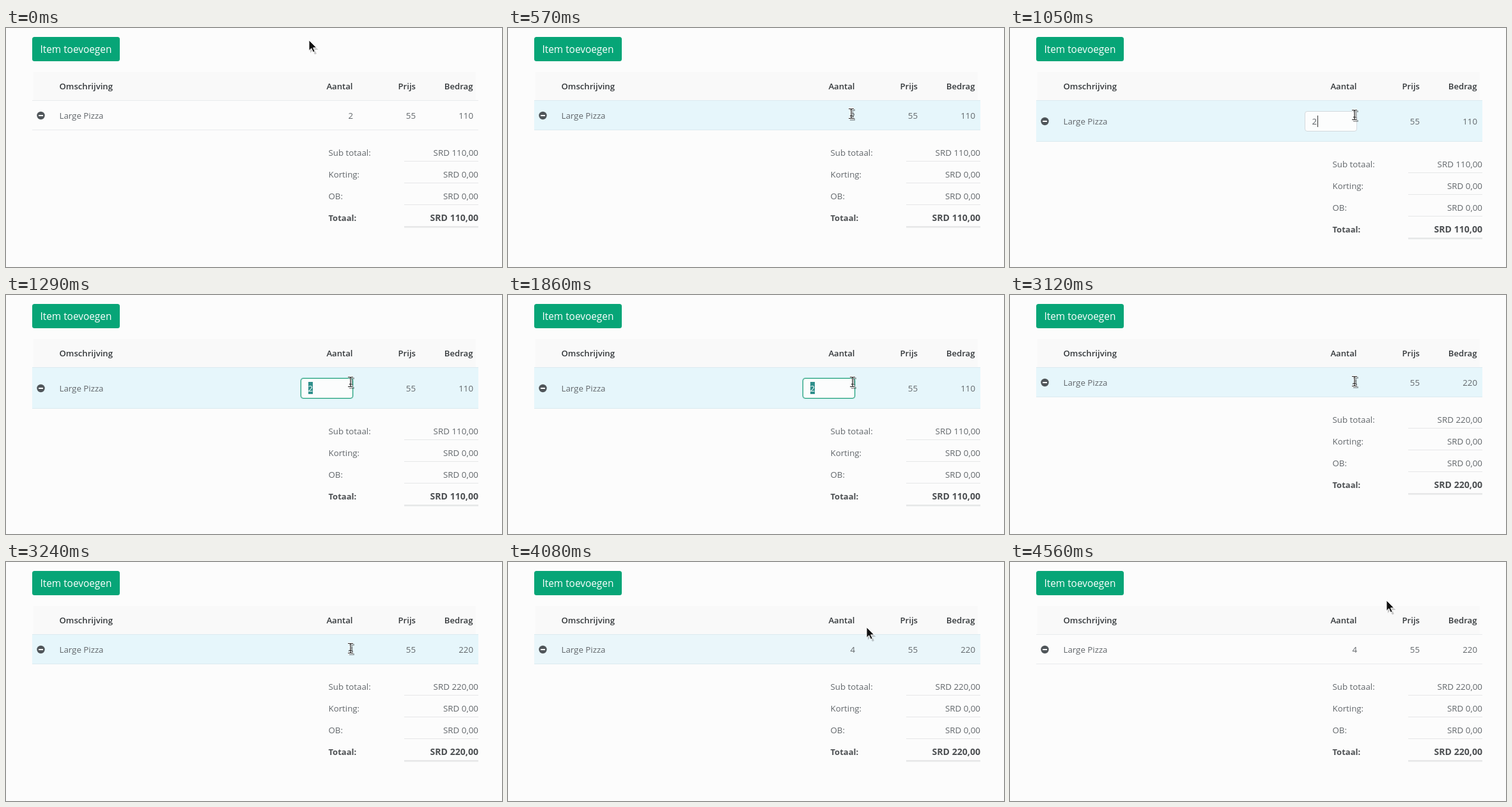
Animation of 776 by 374 pixels, one loop 5310 ms. Source, as an HTML page:

```html
<!DOCTYPE html>
<html lang="nl">
<head>
<meta charset="utf-8">
<style>
html, body { margin: 0; width: 100%; height: 100%; overflow: hidden; background: #fcfcfc; }
svg { display: block; }
text { font: 13.3px "Open Sans", "Noto Sans", sans-serif; fill: #62676b; }
.head text { font-weight: 600; font-size: 13.15px; fill: #34383b; }
.right { text-anchor: end; }
.sum .right text { font-size: 13.4px; }
.sum line { stroke: #e6e7e8; }
.sum .bold { font-weight: 700; fill: #4c4f52; }
.sum .right .bold { font-size: 14.1px; }
</style>
</head>
<body>
<svg width="776" height="374" viewBox="0 0 776 374">
  <rect x="41" y="14" width="137" height="38" rx="3.5" fill="#07a577"/>
  <text x="53.5" y="39" style="font-size:15.4px;fill:#fff">Item toevoegen</text>

  <rect x="43" y="69" width="692" height="44" fill="#f9f9f9"/>
  <g class="head">
    <text x="83.5" y="96">Omschrijving</text>
    <g class="right">
      <text x="542.5" y="96">Aantal</text>
      <text x="641" y="96">Prijs</text>
      <text x="730.5" y="96">Bedrag</text>
    </g>
  </g>

  <rect id="hover" x="41" y="114" width="698" fill="#e6f6fb"/>
  <path id="rules"/>
  <g id="row">
    <circle cx="54.5" cy="137" r="6.2" fill="#50565a"/>
    <rect x="51" y="136" width="7" height="2" rx=".5" fill="#fff"/>
    <text x="83.5" y="142">Large Pizza</text>
    <g class="right">
      <text id="count" x="543" y="142"></text>
      <text x="641" y="142">55</text>
      <text id="amount" x="731" y="142"></text>
    </g>
  </g>

  <g id="sums" class="sum">
    <text x="504.5" y="200">Sub totaal:</text>
    <text x="504.5" y="234">Korting:</text>
    <text x="504.5" y="268">OB:</text>
    <text x="504.5" y="302" class="bold" style="font-size:13px">Totaal:</text>
    <g class="right">
      <text id="sub" x="739" y="200"></text>
      <text x="739" y="234">SRD 0,00</text>
      <text x="739" y="268">SRD 0,00</text>
      <text id="total" x="739" y="302" class="bold"></text>
    </g>
    <line x1="623" x2="739" y1="208.5" y2="208.5"/>
    <line x1="623" x2="739" y1="242.5" y2="242.5"/>
    <line x1="623" x2="739" y1="276.5" y2="276.5"/>
    <line x1="623" x2="739" y1="311.3" y2="311.3" stroke-width="2.6"/>
  </g>

  <g id="input">
    <rect x="461.5" y="130.5" width="81" height="31" rx="3.5" fill="#fcfdfd" stroke="#d3d9dd"/>
    <g id="focus" fill="none">
      <rect x="460.5" y="129.5" width="83" height="33" rx="4.5" stroke="#09a577" stroke-opacity=".25"/>
      <rect x="461.5" y="130.5" width="81" height="31" rx="3.5" stroke="#1d9d79"/>
    </g>
    <rect id="select" x="473" y="136" width="7" height="19" fill="#308f8b"/>
    <text id="value" x="472.5" y="151"></text>
    <path id="caret" d="M481.5 137v18" stroke="#333"/>
  </g>

  <g id="arrow">
    <path d="M2 3v17l4-4 3 6.5 3-1.3-3-6.2h5.5z" fill="#000" opacity=".2"/>
    <path d="M0 0v16.5l3.8-3.6 2.7 6 2.8-1.2-2.7-5.8h5.2z" fill="#111" stroke="#fff"/>
  </g>
  <g id="beam" fill="none">
    <path id="shade" transform="translate(2 2)" stroke="#000" stroke-opacity=".35" stroke-width="2.5"/>
    <path id="halo" stroke="#fff" stroke-width="3"/>
    <path id="stem" stroke="#222" stroke-width="1.2"/>
  </g>
</svg>
<script>
const LOOP = 5310, STEP = 30, OPEN = 1050, TYPED = 2310, CLOSE = 2820;
const $ = id => document.getElementById(id);
const set = (id, attrs) => { for (const k in attrs) $(id).setAttribute(k, attrs[k]); };
const show = (id, on) => set(id, { opacity: +on });
const move = (id, x, y) => set(id, { transform: `translate(${x} ${y})` });
const clamp = v => Math.max(0, Math.min(1, v));
const ease = v => v * v * (3 - 2 * v);

// time, x, y
const path = [
  [0, 474, 19], [180, 474, 19], [570, 537, 134], [720, 538, 135],
  [870, 539, 136], [1830, 539, 136], [1920, 539, 135],
  [3900, 539, 135], [4290, 589, 60], [LOOP, 589, 60]
];

function pointer(t) {
  const i = path.findIndex(p => p[0] > t);
  const [t0, x0, y0] = path[i - 1], [t1, x1, y1] = path[i];
  const k = ease((t - t0) / (t1 - t0));
  return [Math.round(x0 + (x1 - x0) * k), Math.round(y0 + (y1 - y0) * k)];
}

const ibeam = "M-4-7.5h3l1 1 1-1h3M0-6.5v13M-4 7.500h3l1-1 1 1h3M-2 3.500h4";
for (const id of ["shade", "halo", "stem"]) set(id, { d: ibeam });

function draw(t) {
  const [x, y] = pointer(t);
  const inRow = y > 113;
  const editing = t >= OPEN && t < CLOSE;
  const done = t >= CLOSE;
  const selected = t >= OPEN + STEP && t < TYPED;
  const grow = editing ? 18 : 0;
  const bottom = 159.5 + grow;

  show("arrow", !inRow);
  show("beam", inRow);
  move("arrow", x, y);
  move("beam", x, y);

  const hover = clamp((t - 420) / 150) * (1 - clamp((t - 4050) / 150));
  set("hover", { height: bottom - 114, opacity: hover });
  set("rules", {
    d: `M41 113.5H739M41 ${bottom}H739`,
    stroke: hover > .5 ? "#dbeaf0" : "#e9ebed"
  });
  move("row", 0, grow / 2);
  move("sums", 0, grow);

  const amount = done ? 220 : 110;
  $("count").textContent = done ? 4 : 2;
  show("count", !editing);
  $("amount").textContent = amount;
  $("sub").textContent = $("total").textContent = `SRD ${amount},00`;

  show("input", editing);
  show("focus", clamp((t - OPEN) / 150));
  $("value").textContent = t < TYPED ? 2 : 4;
  $("value").style.fill = selected ? "#fff" : "#5d6266";
  show("select", selected);
  show("caret", editing && !selected && t < 2790);
}

function tick() {
  const t = performance.now() % LOOP;
  draw(Math.floor(t / STEP) * STEP);
  requestAnimationFrame(tick);
}
tick();
</script>
</body>
</html>
```
